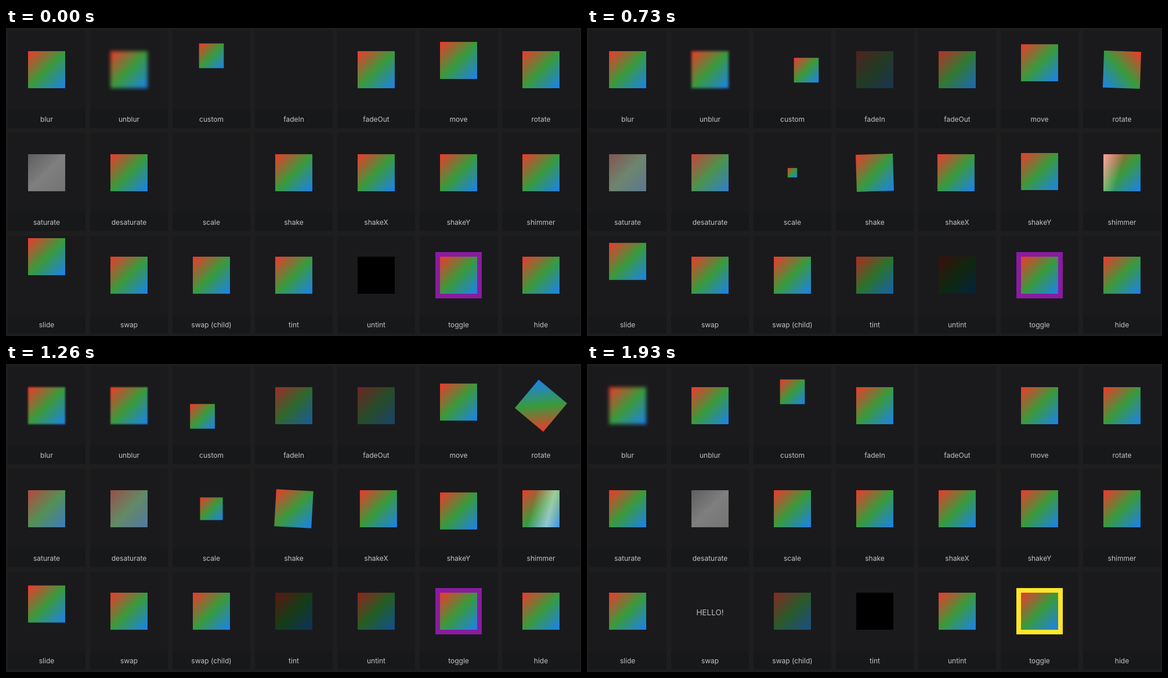
An HTML page for the animation above (2030 ms loop, 991 px wide and 532 px high).

```html
<!DOCTYPE html>
<html lang="en">
<head>
<meta charset="utf-8">
<title>Effects</title>
<style>
  html, body { margin: 0; width: 100%; height: 100%; overflow: hidden; background: #1e1e1f; }
  #stage { position: relative; width: 991px; height: 532px; overflow: hidden; }
  .tile { position: absolute; width: 134px; height: 169.5px; background: #1a1a1c; }
  .label {
    position: absolute; left: 0; right: 0; bottom: 0; height: 32px;
    background: #17181a; color: #c4c4c6; text-align: center;
    font: 12px/34px Inter, Roboto, sans-serif;
  }
  .box {
    position: absolute; left: 35px; top: 36.5px; width: 64px; height: 64px;
    background: linear-gradient(135deg, #ef382c, #3a9a3c, #1c80ee);
  }
  .hello {
    position: absolute; left: 0; right: 0; top: 60px; text-align: center;
    color: #bcbcbc; font: 13.5px/20px Inter, Roboto, sans-serif;
  }
</style>
</head>
<body>
<div id="stage"></div>
<script>
const HOLD = 400, STEP = 200 / 3, LOOP = 2030;
const TAU = Math.PI * 2;

const wave = p => Math.sin(p * 10 * TAU);
const blur = p => ({ filter: `blur(${3 * p}px)` });
const fade = p => ({ opacity: p });
const saturate = p => ({ filter: `saturate(${p})` });
const tint = p => ({ filter: `brightness(${1 - p})` });
const shift = (x, y) => ({ transform: `translate(${x}px, ${y}px)` });
const rotate = deg => ({ transform: `rotate(${deg}deg)` });

function shimmer(p) {
  const at = dx => `calc(50% + ${145 * (p - 0.5) + dx}px)`;
  const band = `linear-gradient(105deg, #fff0 ${at(-32)}, #ffffff80 ${at(0)}, #fff0 ${at(32)})`;
  return { backgroundImage: `${band}, linear-gradient(135deg, #ef382c, #3a9a3c, #1c80ee)` };
}

function orbit(p) {
  const { transform } = shift(24 * Math.sin(p * TAU), -24 * Math.cos(p * TAU));
  return { transform: `${transform} scale(0.667)` };
}

// Each effect maps progress 0..1 to the box's style.
const effects = {
  blur,
  unblur: p => blur(1 - p),
  custom: orbit,
  fadeIn: fade,
  fadeOut: p => fade(1 - p),
  move: p => shift(0, -16 * (1 - p)),
  rotate: p => rotate(360 * p),
  saturate,
  desaturate: p => saturate(1 - p),
  scale: p => ({ transform: `scale(${p})` }),
  shake: p => rotate(5 * wave(p)),
  shakeX: p => shift(6 * wave(p), 0),
  shakeY: p => shift(0, 6 * wave(p)),
  shimmer,
  slide: p => shift(0, -32 * (1 - p)),
  swap: p => fade(p < 1 ? 1 : 0),
  'swap (child)': p => fade(p < 1 ? 1 : 0.5),
  tint,
  untint: p => tint(1 - p),
  toggle: p => ({ boxShadow: `0 0 0 8px ${p < 1 ? '#891ca0' : '#fee62c'}` }),
  hide: p => fade(p < 1 ? 1 : 0),
};

function add(parent, className, text = '') {
  const el = document.createElement('div');
  el.className = className;
  el.textContent = text;
  return parent.appendChild(el);
}

const stage = document.getElementById('stage');
let hello;
const boxes = Object.entries(effects).map(([name, effect], i) => {
  const tile = add(stage, 'tile');
  tile.style.left = 3 + 142 * (i % 7) + 'px';
  tile.style.top = 3.5 + 177.5 * Math.floor(i / 7) + 'px';
  add(tile, 'label', name);
  if (name === 'swap') hello = add(tile, 'hello', 'HELLO!');
  return { style: add(tile, 'box').style, effect };
});

// Progress advances in 15 fps steps after an initial hold.
function progress(t) {
  if (t < HOLD) return 0;
  const step = 1 + Math.floor((t - HOLD + 10.3) / STEP);
  return Math.min(1, (4 * step - 1) / 90);
}

function draw() {
  const p = progress(performance.now() % LOOP);
  for (const { style, effect } of boxes) Object.assign(style, effect(p));
  hello.style.opacity = p < 1 ? 0 : 1;
  requestAnimationFrame(draw);
}
draw();
</script>
</body>
</html>
```
